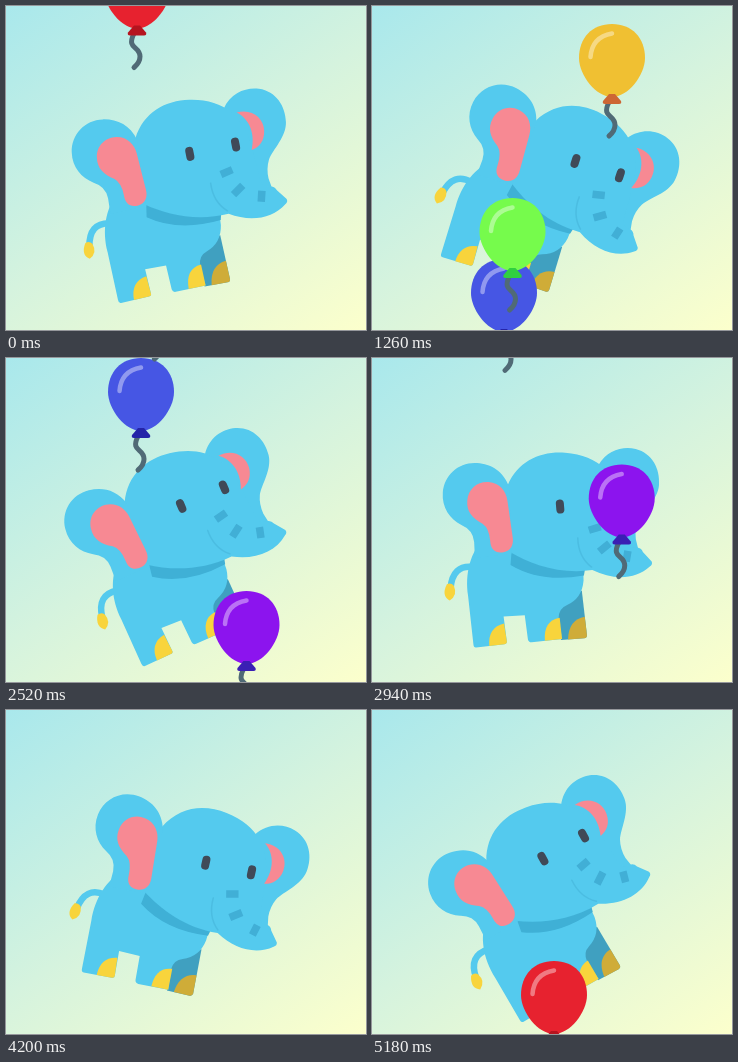
An HTML page for the animation above (5.32 s loop, 360 by 324 pixels).

```html
<!DOCTYPE html>
<html lang="en">
<head>
<meta charset="utf-8">
<title>Elephant and balloons</title>
<style>
html, body { margin: 0; width: 100%; height: 100%; overflow: hidden; }
svg { display: block; width: 100vw; height: 100vh; background: linear-gradient(145deg, #a9e8ec, #d5f3de 50%, #fcffcc); }
.line { fill: none; stroke-linecap: round; stroke-linejoin: round; }
</style>
</head>
<body>
<svg viewBox="0 0 360 324">
  <defs>
    <path id="string" class="line" d="M-3 44C-11 60 3 56 3 67Q3 73-3 78" stroke="#506a76" stroke-width="5"/>
    <path id="knot" d="M-3 36H3L9 43Q10 46 7 46H-7Q-10 46-9 43Z"/>
    <path id="skin" d="M0-34C20-34 33-20 33 0C33 17 16 39 0 39C-16 39-33 17-33 0C-33-20-20-34 0-34Z"/>
    <path id="shine" class="line" d="M-21.500-1Q-20-21 0-24.500" stroke="#fff" stroke-opacity=".4" stroke-width="4.5"/>
  </defs>
  <g id="elephant" fill="#54caee">
    <!-- tail -->
    <path class="line" d="M103 215Q82 214 82 238" stroke="#54caee" stroke-width="6.5"/>
    <path d="M78 234Q82 232 85 235Q90 244 82 250Q73 246 78 234Z" fill="#f8d43c"/>
    <!-- far leg -->
    <path d="M188 246L213 230L221.500 274Q222 277 219 277.500L196 281Z" fill="#40a0c0"/>
    <path d="M203 280Q202 260 218 256L221.500 274Q222 277 219 277.500Z" fill="#cfac38"/>
    <!-- body and near legs -->
    <path d="M112 185C99 200 95 222 100 244L109 292Q109.500 295.500 112 295L140 289.500Q143 289 142 286L137 262L158 259L163 283Q164 286 167 285.500L197 280L192 260Q191 250 199 246Q214 238 214 220L211 190Z"/>
    <path d="M125 292.500Q122 274 138 269L142 286Q143 289 140 289.500Z" fill="#f8d43c"/>
    <path d="M180 283Q177 263 193 259L197 280Z" fill="#f8d43c"/>
    <path d="M140 196Q175 214 215 204L214 215Q172 226 140 210Z" fill="#3fb0d6"/>
    <!-- right ear -->
    <path d="M220 104C228 88 243 83 256 85C273 88 282 103 282 119C282 134 268 146 264 156Q261 165 263 175L266 184H230Z"/>
    <!-- head and trunk -->
    <path d="M131 131C140 105 162 94 186 94C220 94 240 112 247 142L253 168Q255 184 262 183L265 183Q269 183 271 187L280.500 196Q282 199 279 201C266 215 244 218 222 209C190 216 160 208 138 197L118 180Z"/>
    <path d="M233 108C248 104 260 114 260 127C260 137 255 143 247 146C251 130 246 115 233 108Z" fill="#f78993"/>
    <!-- left ear -->
    <path d="M133 133C126 117 113 111 99 111C81 111 67 125 67 143C67 158 76 169 88 174Q100 178 102 190L104 206L140 199Z"/>
    <path d="M92 149C92 137 101 129 112 129C123 129 130 137 132 146L140 182C142 190 139 196 132 198C124 200 119 196 118 188Q116 175 109 171C98 166 92 160 92 149Z" fill="#f78993"/>
    <!-- face -->
    <path class="line" d="M205 178Q207 197 221 206" stroke="#3fa9d0" stroke-width="1.500" opacity=".4"/>
    <path d="M215.500 169.500L227 165M227.500 190L237 181M255 198L256 187" stroke="#41afd6" stroke-width="7.500"/>
    <path class="line" d="M184.500 145L185.500 151M230.500 137L231.500 143" stroke="#404a58" stroke-width="8"/>
  </g>
  <g id="balloons"></g>
</svg>
<script>
const LOOP = 5320, STEP = 140, SWING = 2800, PEAK = 972;
const elephant = document.getElementById('elephant');
const layer = document.getElementById('balloons');

// A balloon passes (x, y) at time t, with drift, rising speed and acceleration in px/ms.
const balloons = [
  { fill: '#e7222f', knot: '#b5141f', t: 0, x: 131, y: -16.500, drift: 0, rise: .25 },
  { fill: '#f0c032', knot: '#cd6634', t: 1260, x: 240, y: 52, drift: 0, rise: .285 },
  { fill: '#4656e4', knot: '#2424a8', t: 1260, x: 132, y: 287, drift: .0024, rise: .1733, gain: 2.18e-5 },
  { fill: '#76fb4c', knot: '#30cf40', t: 1260, x: 140.500, y: 226, drift: .0087, rise: .2072 },
  { fill: '#8c14ee', knot: '#3a1fb4', t: 2520, x: 240.500, y: 267, drift: .022, rise: .29 },
  { fill: '#e7222f', knot: '#b5141f', t: 5180, x: 182, y: 285, drift: 0, rise: .2 }
];

for (const b of balloons) {
  b.node = document.createElementNS('http://www.w3.org/2000/svg', 'g');
  b.node.innerHTML = `<use href="#string"/><use href="#skin" fill="${b.fill}"/>
    <use href="#knot" fill="${b.knot}"/><use href="#shine"/>`;
  layer.append(b.node);
}

function draw(time) {
  const t = Math.floor(time % LOOP / STEP) * STEP;
  const phase = ((t - PEAK) / SWING + 1) % 1;
  const angle = 30 - 120 * Math.min(phase, 1 - phase);
  // The elephant is drawn leaning back by ten degrees.
  elephant.setAttribute('transform', `rotate(${angle + 10} 180 189)`);
  for (const { node, t: at, x, y, drift, rise, gain = 2.64e-5 } of balloons) {
    const d = t - at;
    node.setAttribute('transform', `translate(${x + drift * d} ${y - rise * d - gain * d * d})`);
  }
}

let start;
function loop(now) {
  start ??= now;
  draw(now - start);
  requestAnimationFrame(loop);
}
requestAnimationFrame(loop);
</script>
</body>
</html>
```
